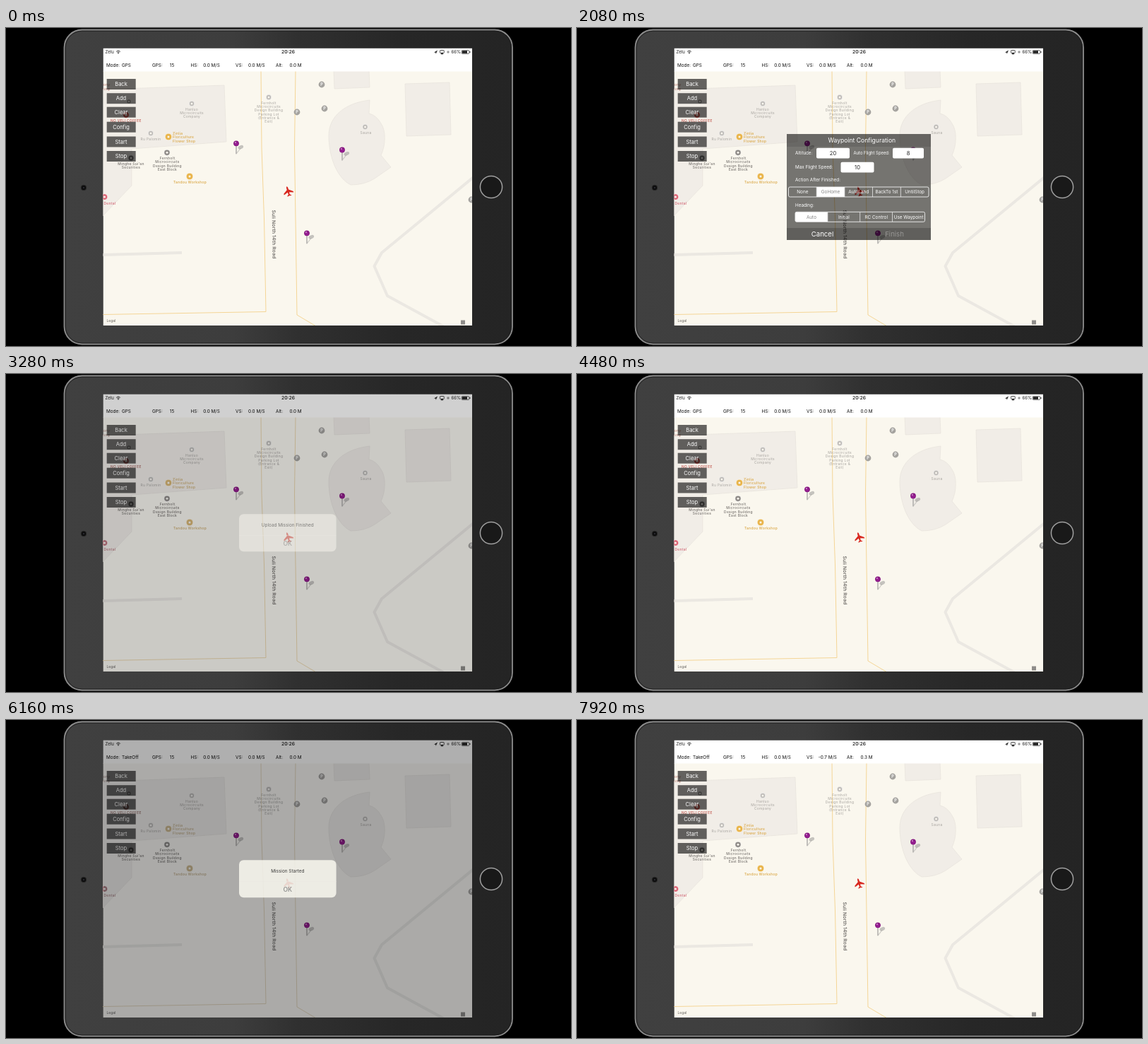
These frames come from a looping animation (800x450 px, 8000 ms). An HTML page with a canvas:

```html
<!DOCTYPE html>
<html lang="en">
<head>
<meta charset="utf-8">
<title>Waypoint mission</title>
<style>
html, body { margin: 0; width: 100%; height: 100%; overflow: hidden; background: #000; }
canvas { display: block; width: 800px; height: 450px; }
</style>
</head>
<body>
<canvas id="stage" width="800" height="450"></canvas>
<script>
const ctx = document.getElementById('stage').getContext('2d');
const LOOP = 8000, STEP = 80;
const FONT = 'Inter, "Liberation Sans", sans-serif';
const SCREEN = { x: 137.5, y: 28.5, w: 522.5, h: 392.5 };

const ramp = (t, a, b) => {
  const k = Math.min(1, Math.max(0, (t - a) / (b - a)));
  return k * k * (3 - 2 * k);
};
const pulse = (t, inA, inB, outA, outB) => ramp(t, inA, inB) - ramp(t, outA, outB);
const within = (t, a, b) => t >= a && t < b;

function text(str, x, y, size, color, align = 'left', weight = 400, spacing = 0) {
  ctx.font = `${weight} ${size}px ${FONT}`;
  ctx.letterSpacing = spacing + 'px';
  ctx.textAlign = align;
  ctx.textBaseline = 'middle';
  ctx.fillStyle = color;
  ctx.fillText(str, x, y + size * 0.05);
}

function rect(x, y, w, h, color) {
  ctx.fillStyle = color;
  ctx.fillRect(x, y, w, h);
}

function round(x, y, w, h, r, fill, stroke, line = 1) {
  ctx.beginPath();
  ctx.roundRect(x, y, w, h, r);
  if (fill) { ctx.fillStyle = fill; ctx.fill(); }
  if (stroke) { ctx.strokeStyle = stroke; ctx.lineWidth = line; ctx.stroke(); }
}

function disc(x, y, r, fill, stroke, line = 1) {
  ctx.beginPath();
  ctx.arc(x, y, r, 0, 7);
  if (fill) { ctx.fillStyle = fill; ctx.fill(); }
  if (stroke) { ctx.strokeStyle = stroke; ctx.lineWidth = line; ctx.stroke(); }
}

function trace(points, close) {
  ctx.beginPath();
  for (let i = 0; i < points.length; i += 2) ctx.lineTo(points[i], points[i + 1]);
  if (close) ctx.closePath();
}

function area(points, fill, stroke) {
  trace(points, true);
  ctx.fillStyle = fill;
  ctx.fill();
  if (stroke) { ctx.strokeStyle = stroke; ctx.lineWidth = 0.7; ctx.stroke(); }
}

function line(points, color, width) {
  trace(points);
  ctx.strokeStyle = color;
  ctx.lineWidth = width;
  ctx.lineJoin = 'round';
  ctx.stroke();
}

function drawTablet() {
  rect(0, 0, 800, 450, '#000');
  const shade = ctx.createLinearGradient(82, 0, 717, 0);
  shade.addColorStop(0, '#404040');
  shade.addColorStop(0.38, '#3d3d3d');
  shade.addColorStop(0.52, '#303030');
  shade.addColorStop(0.75, '#272727');
  shade.addColorStop(1, '#242424');
  round(82.5, 2.5, 634.5, 445, 25, shade, '#8c8c8c', 1.8);
  round(84.3, 4.3, 631, 441.5, 23.5, null, '#1d1d1d', 0.8);
  disc(110, 226, 3.8, '#0c0c0c', '#2a2a2a');
  disc(110, 226, 1.3, '#26262c');
  disc(687, 225, 15.6, '#191919', '#a0a0a0', 1.5);
}

function drawStatus() {
  rect(SCREEN.x, SCREEN.y, SCREEN.w, 33, '#fff');
  text('Zelu', 140.5, 34, 6, '#222');
  ctx.strokeStyle = '#222';
  ctx.lineWidth = 0.9;
  for (const r of [2, 3.8]) {
    ctx.beginPath();
    ctx.arc(159, 36, r, -2.4, -0.74);
    ctx.stroke();
  }
  disc(159, 35.7, 0.8, '#222');
  text('20:26', 399.5, 34, 6.8, '#111', 'center', 500);
  area([606, 34.4, 611, 31.6, 608.7, 36.8, 608.3, 34.7], '#222');
  round(614.6, 31.5, 5.6, 4, 0.6, null, '#222', 0.8);
  area([615.4, 37.2, 617.4, 34.2, 619.4, 37.2], '#222');
  disc(626, 34, 1.7, '#9a9a9a');
  text('66%', 630.5, 34, 6.1, '#222');
  round(645.2, 31.6, 10.6, 4.8, 1, null, '#222', 0.7);
  rect(646, 32.4, 7, 3.2, '#111');
  rect(656.4, 33, 1, 2, '#222');
}

function drawTelemetry(t) {
  const speed = t < 7360 ? 0 : Math.min(0.7, 0.1 + Math.floor((t - 7360) / 80) * 0.1);
  const height = t < 7520 ? 0 : Math.min(0.3, 0.1 + Math.floor((t - 7520) / 160) * 0.1);
  const vs = (speed ? '-' : '') + speed.toFixed(1) + ' M/S';
  const put = (s, x, align) => text(s, x, 52.3, 6.4, '#111', align);
  put('Mode:', 142);
  put(t < 5040 ? 'GPS' : 'TakeOff', 164);
  put('GPS:', 207);
  put('15', 235, 'center');
  put('HS:', 261.5);
  put('0.0 M/S', 291, 'center');
  put('VS:', 325);
  put(vs, 354.8, 'center');
  put('Alt:', 382);
  put(height.toFixed(1) + ' M', 410, 'center');
}

function label(lines, x, y, color, align = 'center', weight = 400) {
  lines.split('/').forEach((s, i) => text(s, x, y + i * 5.3, 4.9, color, align, weight, 0.3));
}

function spot(x, y, color, r = 3.7) {
  disc(x, y, r, color, 'rgba(255,255,255,.8)', 0.7);
  disc(x, y, 1.5, '#f8f5ee');
}

function parking(x, y) {
  disc(x, y, 4.4, '#a5a39f');
  text('P', x, y, 5.6, '#fff', 'center', 600);
}

function drawMap(grey) {
  const block = '#f1ede7', edge = '#e7e2db', path = '#ebe8e2', amber = '#f4d596';
  const pale = '#a8a5a0', dark = '#77736f', gold = '#d9a540', icon = '#bdbab6';
  rect(SCREEN.x, 61, SCREEN.w, 360, '#faf7ee');
  area([136, 87, 309, 81, 312, 161, 178, 171, 178, 223, 136, 267], block, edge);
  area([464, 60, 514, 60, 515, 84, 465, 86], block, edge);
  area([565, 79, 628, 77, 630, 151, 567, 153], block, edge);
  ctx.beginPath();
  ctx.moveTo(515, 102);
  ctx.bezierCurveTo(480, 106, 457, 125, 457, 152);
  ctx.bezierCurveTo(457, 185, 470, 213, 488, 222);
  ctx.quadraticCurveTo(508, 222, 522, 213);
  ctx.lineTo(545, 197);
  ctx.lineTo(531, 180);
  ctx.bezierCurveTo(538, 165, 538, 145, 531, 135);
  ctx.quadraticCurveTo(524, 123, 514, 121);
  ctx.closePath();
  ctx.fillStyle = block;
  ctx.fill();
  ctx.strokeStyle = edge;
  ctx.lineWidth = 0.7;
  ctx.stroke();

  line([136, 321, 249, 318], path, 4);
  line([662, 211, 532, 318, 521.5, 337, 540, 379, 619, 422], path, 4);
  line([361, 61, 362, 170, 365.5, 270, 368, 401.5, 136, 405.5], amber, 1);
  line([410, 61, 408.5, 170, 412, 406, 439, 422], amber, 1);

  label('tony/king', 136, 80.5, '#b5766c', 'left');
  spot(170, 123, '#c4574f', 4.4);
  spot(174, 104, '#8a8580', 3);
  label('NO VELI COFFEE', 148, 131.5, '#c4574f', 'left', 500);
  spot(263, 107, icon);
  label('Hanluo/Microcircuits/Company', 263, 115, pale);
  spot(372, 98, icon);
  label('Fernholt/Microcircuits/Design Building/Parking Lot/(Entrance &/Exit)', 372, 106, pale);
  spot(205, 149, icon);
  label('Ru Palomin', 205, 157, pale);
  spot(230, 154, '#e9b54c', 4.8);
  label('Zinlia/Floriculture/Flower Shop', 236, 149.2, gold, 'left', 500);
  spot(228, 176.3, '#8f8b87', 4.1);
  label('Fernholt/Microcircuits/Design Building/East Block', 228.5, 184.3, dark, 'center', 500);
  spot(177, 184, '#6f6b68', 4);
  label("Minghe Sui'an/Securities", 177, 191.8, dark, 'center', 500);
  spot(260, 210, '#e9b54c', 4.8);
  label('Tandou Workshop', 260.5, 218.2, gold, 'center', 500);
  spot(139.5, 239, '#dc6878', 4.3);
  label('Dental', 138.5, 248, '#d46a78', 'left', 500);
  spot(508.5, 140, icon);
  label('Sauna', 509.5, 148, pale);
  [[447, 80], [412, 119], [451, 114], [659, 243]].forEach(p => parking(...p));

  ctx.save();
  ctx.translate(379.5, 292);
  ctx.rotate(1.557);
  text('Suli North 14th Road', 0, 0, 6.8, '#5d5a57', 'center', 500, 0.15);
  ctx.restore();

  text('Legal', 142.5, 413.8, 5, '#66635f');
  rect(644, 413.5, 6, 6, '#8f8d8a');

  if (grey > 0) {
    ctx.save();
    ctx.globalCompositeOperation = 'saturation';
    ctx.globalAlpha = grey * 0.75;
    rect(SCREEN.x, 61, SCREEN.w, 360, '#808080');
    ctx.restore();
  }
}

function drawPin(x, y) {
  ctx.strokeStyle = 'rgba(110,110,110,.3)';
  ctx.lineWidth = 1.2;
  ctx.beginPath();
  ctx.moveTo(x + 0.5, y + 14);
  ctx.lineTo(x + 6, y + 7);
  ctx.stroke();
  ctx.fillStyle = 'rgba(110,110,110,.38)';
  ctx.beginPath();
  ctx.ellipse(x + 6.3, y + 5.4, 4, 2.4, -0.4, 0, 7);
  ctx.fill();
  rect(x - 0.7, y + 3, 1.4, 12, '#a9a7a6');
  disc(x, y, 3.9, '#861781');
  disc(x, y + 0.6, 2.6, '#961f91');
  disc(x - 1.1, y - 1.4, 1, '#d79ad4');
}

function drawPlane() {
  ctx.save();
  ctx.translate(399.5, 231);
  ctx.rotate(-0.28);
  ctx.beginPath();
  const half = [0, -7.3, 1.1, -5.5, 1.2, -2.2, 7, 2, 7, 3.6, 1.2, 1.6, 0.9, 4.6, 2.9, 6.2, 2.9, 7.2, 0, 6.4];
  for (let i = 0; i < half.length; i += 2) ctx.lineTo(half[i], half[i + 1]);
  for (let i = half.length - 2; i >= 0; i -= 2) ctx.lineTo(-half[i], half[i + 1]);
  ctx.closePath();
  ctx.fillStyle = '#d8281f';
  ctx.fill();
  ctx.restore();
}

function drawButtons(t) {
  const rows = [['Back', 72], ['Add', 92.2], ['Clear', 111.7], ['Config', 132.7], ['Start', 153.5], ['Stop', 174]];
  const pressed = within(t, 240, 480) ? 'Config' : within(t, 4720, 4960) ? 'Start' : '';
  for (const [name, y] of rows) {
    rect(142.7, y, 41, 15, 'rgba(0,0,0,.6)');
    text(name, 163, y + 7.5, 7.5, name === pressed ? 'rgba(255,255,255,.4)' : '#fff', 'center');
  }
}

function field(x, y, w, value) {
  round(x, y, w, 14.7, 2, '#fff');
  text(value, x + w / 2, y + 7.4, 7.6, '#222', 'center');
}

function segments(x, y, w, names, chosen) {
  const step = w / names.length;
  ctx.save();
  ctx.beginPath();
  ctx.roundRect(x, y, w, 14, 2);
  ctx.clip();
  rect(x + chosen * step, y, step, 14, '#fff');
  for (let i = 1; i < names.length; i++) rect(x + i * step - 0.4, y, 0.8, 14, '#e8e8e8');
  ctx.restore();
  round(x, y, w, 14, 2, null, '#f0f0f0', 0.9);
  names.forEach((s, i) =>
    text(s, x + (i + 0.5) * step, y + 7, 6.4, i === chosen ? '#858585' : '#fff', 'center'));
}

function drawConfig(t) {
  const show = pulse(t, 440, 720, 2100, 2380);
  if (show <= 0) return;
  const white = '#fff';
  ctx.save();
  ctx.globalAlpha = show;
  rect(297, 150, 204, 150, 'rgba(0,0,0,.53)');
  rect(297, 150, 204, 18, 'rgba(0,0,0,.1)');
  rect(297, 283, 204, 17, 'rgba(0,0,0,.18)');
  text('Waypoint Configuration', 403.3, 159.3, 8.6, white, 'center');
  text('Altitude:', 309, 177, 6.2, white);
  field(339, 169.7, 47, '20');
  text('Auto Flight Speed:', 391.5, 177, 5.9, white);
  field(447, 169.7, 44, '8');
  text('Max Flight Speed:', 309, 197, 6.3, white);
  field(373.5, 189.8, 47, '10');
  text('Action After Finished:', 309, 214.3, 6.3, white);
  segments(299.5, 225, 198.5, ['None', 'GoHome', 'AutoLand', 'BackTo 1st', 'UntilStop'], 1);
  text('Heading:', 309, 250.3, 6.3, white);
  segments(309, 260.3, 183.5, ['Auto', 'Initial', 'RC Control', 'Use Waypoint'], 0);
  text('Cancel', 347.5, 291.8, 9.6, white, 'center');
  text('Finish', 449.5, 291.8, 9.6, t >= 1840 ? 'rgba(255,255,255,.35)' : white, 'center');
  ctx.restore();
}

function drawAlert(message, level, scale) {
  if (level <= 0) return;
  ctx.save();
  ctx.globalAlpha = level;
  ctx.translate(398.8, 224.7);
  ctx.scale(scale, scale);
  round(-68.8, -26.5, 137.6, 53, 6.5, '#faf8f0');
  rect(-68.8, 3.6, 137.6, 0.7, '#ebe8e1');
  text(message, 0, -10.6, 6.4, '#1c1c1c', 'center');
  text('OK', 0, 15.6, 8.6, '#858585', 'center', 600);
  ctx.restore();
}

function draw(t) {
  const upload = pulse(t, 2300, 2640, 3120, 3440);
  const started = pulse(t, 4960, 5300, 6080, 6400);
  const dim = upload + started;
  drawTablet();
  ctx.save();
  ctx.beginPath();
  ctx.rect(SCREEN.x, SCREEN.y, SCREEN.w, SCREEN.h);
  ctx.clip();
  drawMap(dim);
  drawStatus();
  drawTelemetry(t);
  [[326, 163.3], [476, 172.5], [426, 290.3]].forEach(p => drawPin(...p));
  drawPlane();
  drawButtons(t);
  drawConfig(t);
  rect(SCREEN.x, SCREEN.y, SCREEN.w, SCREEN.h, `rgba(0,0,0,${0.37 * dim})`);
  drawAlert('Upload Mission Finished', upload, 1.15 - 0.15 * ramp(t, 2300, 2640));
  drawAlert('Mission Started', started, 1.15 - 0.15 * ramp(t, 4960, 5300));
  ctx.restore();
}

const start = performance.now();
function tick() {
  const t = (performance.now() - start) % LOOP;
  draw(Math.floor(t / STEP) * STEP);
  requestAnimationFrame(tick);
}
tick();
</script>
</body>
</html>
```
